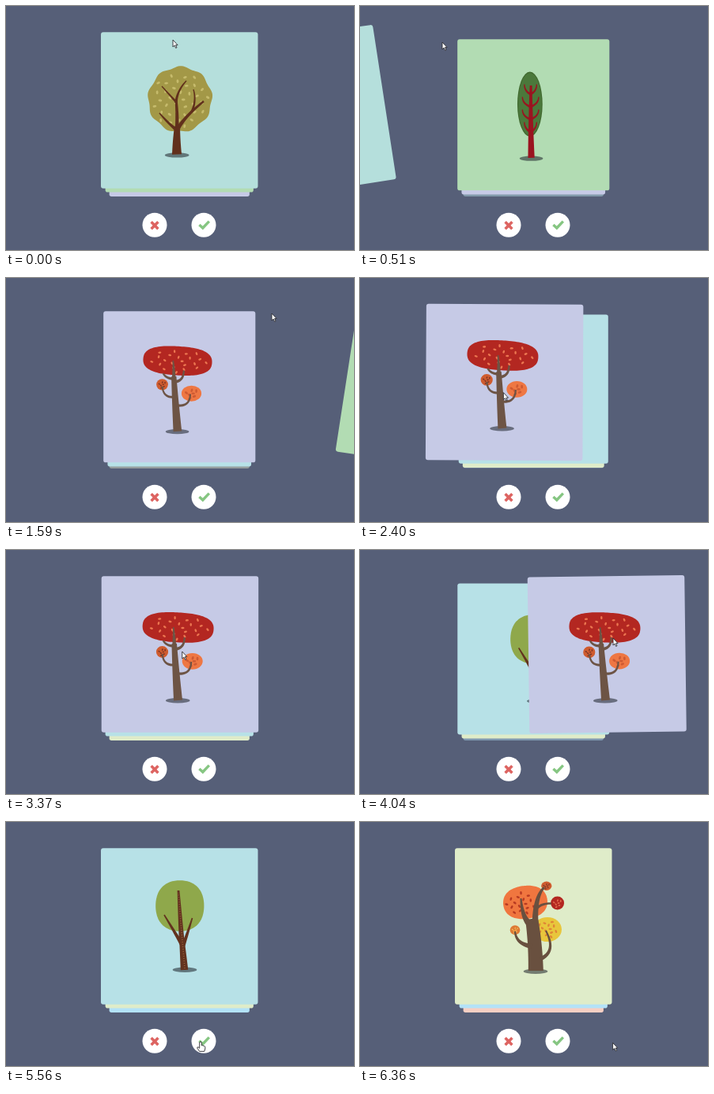
Write an HTML page with a canvas that moves like this. It is 440 px wide and 310 px high and loops after 6410 ms.

```html
<!DOCTYPE html>
<html lang="en">
<head>
<meta charset="utf-8">
<title>Swipe stack</title>
<style>
html, body { margin: 0; width: 100%; height: 100%; overflow: hidden; background: #565f78; }
canvas { display: block; width: 440px; height: 310px; }
</style>
</head>
<body>
<canvas id="stage" width="440" height="310"></canvas>
<script>
const ctx = document.getElementById('stage').getContext('2d');
const LOOP = 6410, CX = 219.25, CY = 132.5, SIZE = 198.5, GONE = 345;

// Progress of t between two times, from 0 to 1
const clamp = (v, a, b) => Math.min(b, Math.max(a, v));
const linear = (t, a, b) => clamp((t - a) / (b - a), 0, 1);
const smooth = (t, a, b) => { const u = linear(t, a, b); return u * u * (3 - 2 * u); };
const easeOut = (t, a, b) => 1 - (1 - linear(t, a, b)) ** 2;
const speedUp = (t, a, b) => linear(t, a, b) ** 1.88;

// Shapes
function ellipse(x, y, rx, ry, color, turn = 0) {
  ctx.fillStyle = color;
  ctx.beginPath();
  ctx.ellipse(x, y, rx, ry, turn, 0, Math.PI * 2);
  ctx.fill();
}

// Ellipse whose radius swells between its lobes
function blob(x, y, rx, ry, color, lobes, swell, turn = 0) {
  ctx.save();
  ctx.translate(x, y);
  ctx.rotate(turn);
  ctx.fillStyle = color;
  ctx.beginPath();
  for (let i = 0; i < 120; i++) {
    const a = i / 120 * Math.PI * 2, r = 1 + swell * (1 - Math.cos(lobes * a));
    ctx.lineTo(rx * r * Math.cos(a), ry * r * Math.sin(a));
  }
  ctx.fill();
  ctx.restore();
}

// Leaves spread in a sunflower pattern inside an ellipse
function specks(x, y, rx, ry, count, color, size) {
  for (let i = 0; i < count; i++) {
    const r = Math.sqrt((i + 0.5) / count), a = i * 2.4;
    ellipse(x + rx * r * Math.cos(a), y + ry * r * Math.sin(a),
      size, size * 0.6, color, a * 1.7);
  }
}

function fruit(x, y, rx, ry, color, seeds) {
  ellipse(x, y, rx, ry, color);
  specks(x, y, rx * 0.65, ry * 0.65, 7, seeds, rx * 0.18);
}

// Tapered branch along a quadratic curve, with flat ends
function limb(color, w0, w1, [x0, y0], [mx, my], [x1, y1]) {
  const left = [], right = [];
  for (let i = 0; i <= 12; i++) {
    const u = i / 12, v = 1 - u, half = (w0 * v + w1 * u) / 2;
    const x = x0 * v * v + 2 * mx * u * v + x1 * u * u;
    const y = y0 * v * v + 2 * my * u * v + y1 * u * u;
    const dir = Math.atan2((my - y0) * v + (y1 - my) * u, (mx - x0) * v + (x1 - mx) * u);
    const nx = half * Math.sin(dir), ny = -half * Math.cos(dir);
    left.push([x + nx, y + ny]);
    right.unshift([x - nx, y - ny]);
  }
  ctx.fillStyle = color;
  ctx.beginPath();
  [...left, ...right].forEach(p => ctx.lineTo(...p));
  ctx.fill();
}

function line(color, width, ...pts) {
  ctx.strokeStyle = color;
  ctx.lineWidth = width;
  ctx.beginPath();
  pts.forEach(p => ctx.lineTo(...p));
  ctx.stroke();
}

const shadow = (x, y) => ellipse(x, y, 15.3, 3.2, 'rgba(28,32,40,.55)');

// Trees
function oliveTree() {
  const bark = '#61301c';
  shadow(216.2, 189.4);
  blob(220, 118.5, 39, 40, '#a39847', 9, 0.03, 0.2);
  specks(220, 119, 36, 36, 36, '#c6bb6c', 2.4);
  limb(bark, 12, 7, [216, 188.5], [215.5, 170], [216.5, 153]);
  limb(bark, 5, 3, [216, 160], [217, 138], [215, 119]);
  limb(bark, 3.4, 1.4, [215, 123], [216, 108], [228, 95]);
  limb(bark, 2.8, 1.2, [215, 122], [207, 113], [197, 102]);
  limb(bark, 4, 1.6, [215, 157], [204, 148], [194, 136]);
  limb(bark, 5, 2.6, [217, 157], [224, 142], [250, 121]);
  limb(bark, 3, 1.3, [235, 134], [241, 120], [237, 106]);
}

function redStemTree() {
  const bark = '#9a1420';
  shadow(216.5, 189.8);
  ellipse(214.7, 118.5, 16.4, 42.5, '#41692f');
  ellipse(214.7, 118.5, 15.2, 41, '#4b783b');
  limb(bark, 8.5, 3, [216.5, 189], [215.5, 140], [216, 94]);
  for (const side of [-1, 1]) {
    for (let i = 0; i < 4; i++) {
      const x = 215.5 + side * (8 + 3 * Math.sin(i * Math.PI / 3));
      const y = 142 - 16.5 * i;
      limb(bark, 3, 1.3, [215.5, y + 13], [x, y + 9], [x, y]);
    }
  }
}

function redTree() {
  const bark = '#6d5445';
  shadow(216.5, 191.3);
  blob(216.9, 98.4, 45, 19, '#b32721', 4, 0.04, 0.06);
  specks(217, 99, 38, 15.5, 22, '#ec7650', 2.1);
  fruit(196.8, 129.5, 7.6, 7.4, '#cf5c2f', '#7a3324');
  fruit(235, 141.3, 13, 10.4, '#ee7743', '#ce5a33');
  limb(bark, 11, 6.5, [216.8, 191], [214, 155], [212, 119]);
  limb(bark, 5, 1.6, [212, 122], [212, 110], [211, 98]);
  limb(bark, 3.6, 2.2, [212, 122], [202, 122], [198, 115]);
  limb(bark, 4, 2.2, [213, 126], [225, 125], [225, 111]);
  limb(bark, 3.2, 2, [212, 146], [198, 147], [197, 132]);
  limb(bark, 3.4, 2, [216, 157], [233, 159], [233.5, 142]);
}

function greenTree() {
  const bark = '#63331f';
  shadow(226, 187.8);
  blob(219.8, 106.5, 30.6, 32.3, '#8fa84b', 4, 0.02);
  limb(bark, 9.5, 6.5, [225.5, 188], [224, 168], [222.5, 152]);
  limb(bark, 7, 2.8, [222.5, 155], [220, 120], [218, 87]);
  limb(bark, 5, 1.6, [222, 155], [211, 136], [200, 118]);
  limb(bark, 5, 1.6, [224, 157], [230, 140], [235.5, 122]);
  ctx.setLineDash([1, 2]);
  line('#98603c', 1.5, [226, 186], [223, 152], [218, 90]);
  ctx.setLineDash([]);
}

function autumnTree() {
  const bark = '#69503f';
  shadow(222, 189.7);
  blob(209, 102, 28, 21, '#f0763f', 4, 0.02, -0.12);
  specks(206, 104, 21, 15, 18, '#b73a22', 2.2);
  ellipse(237, 136.5, 18, 15.6, '#e8c63c');
  specks(238, 136, 13, 11, 13, '#e08536', 2.1);
  fruit(235.8, 81.3, 6.6, 5.7, '#cf5c2f', '#7a3324');
  fruit(249.6, 103, 8.5, 8.4, '#b32721', '#e0694c');
  fruit(196, 137.2, 6.3, 6, '#de7a35', '#f3c25a');
  limb(bark, 19, 16, [222.3, 189], [222, 155], [217, 123]);
  limb(bark, 8, 2, [213, 128], [205, 120], [203.5, 97]);
  limb(bark, 8, 2.6, [221.5, 130], [221, 94], [233, 83]);
  limb(bark, 3.4, 2.4, [223, 110], [230, 103], [242, 103.5]);
  limb(bark, 6, 2, [217, 158], [197, 155], [196, 139]);
  limb(bark, 5, 2, [228, 174], [249, 165], [235, 138]);
}

// x is the sideways offset, tilt the degrees per pixel, next the time span in which the stack moves up
const cards = [
  { color: '#b5dfdc', art: oliveTree, tilt: 0.082, next: [540, 900],
    x: t => -GONE * speedUp(t, 40, 560) },
  { color: '#b2dcb3', art: redStemTree, tilt: 0.082, next: [1580, 1920],
    x: t => GONE * speedUp(t, 1090, 1620) },
  { color: '#c6cae6', art: redTree, tilt: -0.008, next: [4960, 5240],
    x: t => -75 * smooth(t, 2150, 2660) + 168 * smooth(t, 2960, 3840)
      - 93 * smooth(t, 4040, 4420) - GONE * speedUp(t, 4800, 5010) },
  { color: '#b7e1e7', art: greenTree, tilt: 0.0075, next: [6130, 6350],
    x: t => GONE * speedUp(t, 6020, 6190) },
  { color: '#dfecc9', art: autumnTree },
  { color: '#b3e2f8' },
  { color: '#f7cfc3' }
];

// How far the stack has moved up; dragging the top card pulls it along a little
function stackShift(t) {
  return cards.filter(c => c.next).reduce((sum, c) => {
    const pull = Math.min(Math.abs(c.x(t)) / 215, 0.45);
    return sum + Math.max(pull, easeOut(t, ...c.next));
  }, 0);
}

function drawCard(card, depth, t) {
  const x = card.x ? card.x(t) : 0;
  if (depth >= 3 || Math.abs(x) >= GONE) return;
  const d = clamp(depth, 0, 2) * (x ? 0 : 1), scale = 1 / (1 + 0.06 * d);
  ctx.save();
  ctx.globalAlpha = clamp(3 - depth, 0, 1);
  ctx.translate(CX + x, CY + Math.abs(x) * 0.015 * (card.tilt > 0.05) + 10.4 * d);
  ctx.rotate(clamp(x * (card.tilt || 0), -8.7, 8.7) * Math.PI / 180);
  ctx.scale(scale, scale);
  ctx.fillStyle = card.color;
  ctx.beginPath();
  ctx.roundRect(-SIZE / 2, -SIZE / 2, SIZE, SIZE, 3);
  ctx.fill();
  ctx.translate(-CX, -CY);
  if (card.art && depth < 2) card.art();
  ctx.restore();
}

function drawButtons() {
  ellipse(188, 278.2, 15.5, 15.5, '#fff');
  ellipse(250, 278.2, 15.5, 15.5, '#fff');
  line('#dd6461', 3.5, [183.6, 274.2], [192.4, 283.2]);
  line('#dd6461', 3.5, [192.4, 274.2], [183.6, 283.2]);
  line('#86c682', 3.4, [244.4, 278], [248.8, 282], [256.8, 273.6]);
}

// Pointer glides: start, end, then where it arrives
const glides = [
  [60, 450, 104, 46], [560, 940, 223.5, 41], [1100, 1500, 336, 45],
  [1600, 2060, 218, 148], [2150, 2660, 143, 143], [2960, 3840, 320, 112],
  [4060, 4880, 189, 283], [4950, 5330, 243, 280], [5380, 5560, 246, 279],
  [6060, 6350, 319.6, 280.5]
];
const arrow = new Path2D('M0 0V9L2.1 7.1L3.6 10.4L5 9.8L3.6 6.6H6.1Z');
const hand = new Path2D('M-1.3 1Q0 -.8 1.3 1V5Q2.4 4.2 3.2 5.3Q4.4 4.8 4.8 6Q5.8 5.8 5.8 7.2'
  + 'V9L4.8 12.4H-1.4L-4.2 8.2Q-4.4 6.4 -2.8 7L-1.3 8.4Z');

function drawPointer(t) {
  let x = 211, y = 43;
  for (const [from, to, tx, ty] of glides) {
    const u = smooth(t, from, to);
    x += (tx - x) * u;
    y += (ty - y) * u;
  }
  const over = [188, 250].some(b => Math.hypot(x - b, y - 278.2) < 15.5);
  const shape = over ? hand : arrow;
  ctx.save();
  ctx.translate(x, y);
  ctx.fillStyle = '#fff';
  ctx.strokeStyle = '#2b2b30';
  ctx.lineWidth = 0.9;
  ctx.fill(shape);
  ctx.stroke(shape);
  ctx.restore();
}

function draw(t) {
  ctx.fillStyle = '#565f78';
  ctx.fillRect(0, 0, 440, 310);
  drawButtons();
  const shift = stackShift(t);
  for (let i = cards.length - 1; i >= 0; i--) drawCard(cards[i], i - shift, t);
  drawPointer(t);
}

const start = performance.now();
function frame() {
  draw((performance.now() - start) % LOOP);
  requestAnimationFrame(frame);
}
frame();
</script>
</body>
</html>
```
